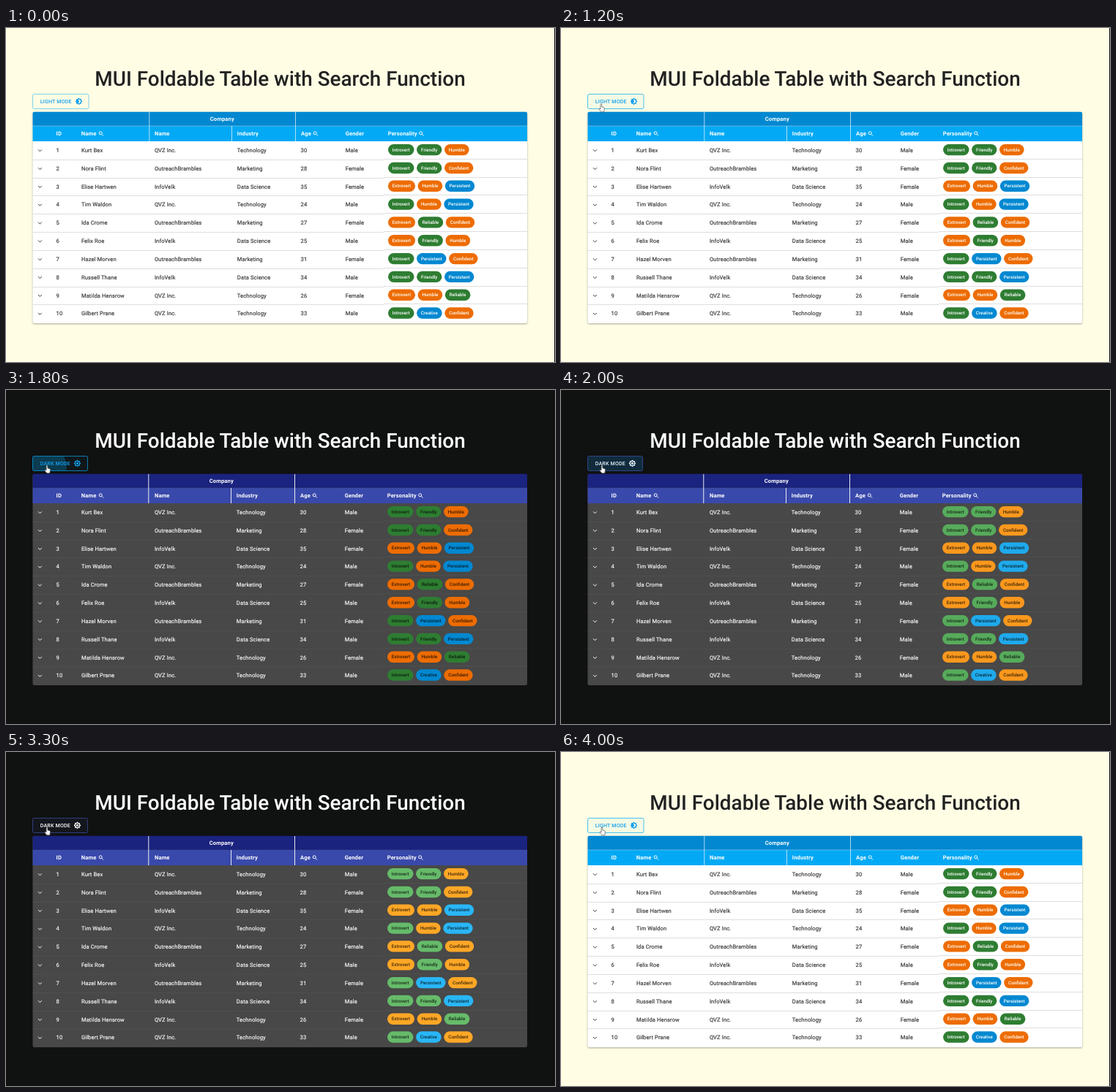
Animation, 750 px wide and 457 px high, one loop 4.4 s. Source, as an HTML page:

```html
<!DOCTYPE html>
<html lang="en">
<head>
<meta charset="utf-8">
<title>Foldable table</title>
<style>
  html, body { margin: 0; width: 100%; height: 100%; overflow: hidden; }
  svg {
    display: block; width: 750px; height: 457px;
    font: 7.58px Roboto, Arial, sans-serif; letter-spacing: .12px;
    text-rendering: geometricPrecision;
    --page: #fffde4; --paper: #fff; --ink: #333; --title: #222;
    --head1: #0288d1; --head2: #03a9f4; --rule: #dedede;
    --split: rgba(235, 245, 250, .75); --headRule: rgba(224, 224, 224, .4);
    --chipText: #fff; --shadow: rgba(0, 0, 0, .35);
  }
  svg.dark {
    --page: #101111; --paper: #484848; --ink: #fff; --title: #fff;
    --head1: #1a237e; --head2: #3949ab; --rule: #4e4e4e;
    --split: rgba(255, 255, 255, .9); --headRule: rgba(81, 81, 81, .25);
    --chipText: rgba(0, 0, 0, .76); --shadow: transparent;
  }
  .dark .shift { transform: translateX(-1px); }
  .title { font-size: 27.9px; font-weight: 500; letter-spacing: 0; fill: var(--title); }
  .head { font-weight: 700; fill: #fff; }
  .cell { fill: var(--ink); stroke: var(--ink); stroke-width: .15px; }
  .chip { font-size: 6.3px; font-weight: 500; letter-spacing: 0; fill: var(--chipText); }
  .label { font-size: 7.1px; font-weight: 500; letter-spacing: .18px; }
  .mid { text-anchor: middle; }
  .line { fill: none; stroke-width: 1; }
</style>
</head>
<body>
<svg id="stage" viewBox="0 0 750 457"></svg>
<script>
const LOOP = 4400, STEP = 100;
const TO_DARK = 1800, TO_LIGHT = 3400;
const MOVE_START = 800, MOVE_END = 1300;

const people = [
  ['Kurt Bex', 0, 30, 'Male', 'IFH'],
  ['Nora Flint', 1, 28, 'Female', 'IFC'],
  ['Elise Hartwen', 2, 35, 'Female', 'EHP'],
  ['Tim Waldon', 0, 24, 'Male', 'IHP'],
  ['Ida Crome', 1, 27, 'Female', 'ERC'],
  ['Felix Roe', 2, 25, 'Male', 'EFH'],
  ['Hazel Morven', 1, 31, 'Female', 'IPC'],
  ['Russell Thane', 2, 34, 'Male', 'IFP'],
  ['Matilda Hensrow', 0, 26, 'Female', 'EHR'],
  ['Gilbert Prane', 0, 33, 'Male', 'IVC']
];
const firms = [
  ['QVZ Inc.', 'Technology'],
  ['OutreachBrambles', 'Marketing'],
  ['InfoVelk', 'Data Science']
];
// label, chip width, colour
const traits = {
  I: ['Introvert', 35.5, 'green'], F: ['Friendly', 34.3, 'green'],
  R: ['Reliable', 34.6, 'green'], H: ['Humble', 33.6, 'orange'],
  C: ['Confident', 39.4, 'orange'], E: ['Extrovert', 37, 'orange'],
  P: ['Persistent', 40.4, 'blue'], V: ['Creative', 34.6, 'blue']
};
const chipColors = {
  green: [[46, 125, 50], [102, 187, 106]],
  orange: [[237, 108, 2], [255, 167, 38]],
  blue: [[2, 136, 209], [41, 182, 246]]
};

const stage = document.getElementById('stage');

function add(tag, attrs, parent = stage, text = '') {
  const el = document.createElementNS('http://www.w3.org/2000/svg', tag);
  for (const key in attrs) el.setAttribute(key, attrs[key]);
  el.textContent = text;
  parent.append(el);
  return el;
}
const rect = (x, y, width, height, fill, more, parent) =>
  add('rect', { x, y, width, height, style: `fill:${fill}`, ...more }, parent);
const path = (d, stroke, more, parent) =>
  add('path', { d, class: 'line', style: `stroke:${stroke}`, ...more }, parent);
const write = (text, x, y, cls, parent) => add('text', { x, y, class: cls }, parent, text);

function searchIcon(x, parent) {
  path(`M${x + .9} 145.4l2.1 2.1M${x + 1.2} 143.8a2 2 0 1 1-4 0a2 2 0 1 1 4 0`, '#fff',
    { 'stroke-width': .85 }, parent);
}

function drawHeader(shifted) {
  rect(36.5, 115, 675.5, 289, 'var(--paper)',
    { rx: 2, style: 'fill:var(--paper);filter:drop-shadow(0 1px 1px var(--shadow))' });
  path('M36.5 134V116.7a2 2 0 0 1 2-2H710a2 2 0 0 1 2 2V134Z', 'none', { style: 'fill:var(--head1)' });
  rect(36.5, 134, 675.5, 21, 'var(--head2)');
  path('M36.5 134H712', 'var(--headRule)');
  path('M195.8 115V155M308.5 134V155M395.5 115V155', 'var(--split)', {}, shifted);
  write('Company', 295.3, 126.6, 'head mid', shifted);
  write('ID', 68.6, 147.2, 'head');
  write('Name', 102.8, 147.2, 'head');
  write('Name', 203, 147.2, 'head');
  for (const [label, x] of [['Industry', 315.8], ['Age', 403], ['Gender', 463.7], ['Personality', 521.7]])
    write(label, x, 147.2, 'head', shifted);
  searchIcon(130, stage);
  searchIcon(423, shifted);
  searchIcon(567.5, shifted);
}

function drawRow([name, firm, age, gender, tags], i, shifted) {
  const y = 167.2 + 24.83 * i, base = y + 2.7;
  if (i < 9) {
    const bottom = Math.round(y + 12.6) + .5;
    path(`M36.5 ${bottom}H516M516 ${bottom - 1}H712`, 'var(--rule)');
  }
  path(`M44 ${y - .8}l2.4 2.4l2.4 -2.4`, 'var(--ink)', { 'stroke-width': 1.2 });
  write(i + 1, 68.6, base, 'cell');
  write(name, 102.9, base, 'cell');
  write(firms[firm][0], 202.9, base, 'cell');
  write(firms[firm][1], 315.8, base, 'cell', shifted);
  write(age, 402.6, base, 'cell', shifted);
  write(gender, 463.7, base, 'cell', shifted);
  let x = 522;
  for (const tag of tags) {
    const [label, width, color] = traits[tag];
    rect(x, y - 8.3, width, 15.4, `var(--${color})`, { rx: 7.7 }, shifted);
    write(label, x + width / 2, y + 1.6, 'chip mid', shifted);
    x += width + 3.6;
  }
}

rect(0, 0, 750, 457, 'var(--page)');
rect(749, 0, 1, 457, '#111');
write('MUI Foldable Table with Search Function', 374.5, 78.8, 'title mid');

const shifted = add('g', { class: 'shift' });
drawHeader(shifted);
stage.append(shifted);
people.forEach((person, i) => drawRow(person, i, shifted));

// Theme button
const clip = add('clipPath', { id: 'inside' });
const clipBox = rect(36.5, 90.5, 76.5, 20, '#000', { rx: 2 }, clip);
const ripple = add('circle', { cx: 56, cy: 105, 'clip-path': 'url(#inside)' });
const box = rect(36.5, 90.5, 76.5, 20, 'none', { rx: 2 });
const label = write('', 46.7, 103, 'label');
const burst = 'M20 8.69V4h-4.69L12 .69 8.69 4H4v4.69L.69 12 4 15.31V20h4.69L12 23.31 15.31 20H20v-4.69L23.31 12Z';
const moon = burst + 'M12 18c-.89 0-1.74-.2-2.5-.55C11.56 16.5 13 14.42 13 12s-1.44-4.5-3.5-5.45C10.26 6.2 11.11 6 12 6c3.31 0 6 2.69 6 6s-2.69 6-6 6Z';
const sun = burst + 'M12 18a6 6 0 1 1 0-12a6 6 0 1 1 0 12ZM12 8a4 4 0 1 0 0 8a4 4 0 1 0 0-8Z';
const icon = add('path', { 'fill-rule': 'evenodd' });

// Pointers
const look = { fill: '#fff', stroke: '#555', 'stroke-width': .7, 'stroke-linejoin': 'round' };
const arrow = add('path', { d: 'M0 0V8.6L2 6.9L3.4 10L4.7 9.4L3.4 6.4H6Z', ...look });
const hand = add('path', {
  d: 'M-.9 .6Q0 -.5 .9 .6V4L3.6 4.7Q4.6 5 4.4 6.2L3.8 10.8H-.2L-3 7.2Q-3.2 6 -2.1 6.2L-.9 7Z', ...look
});

const clamp = v => Math.min(1, Math.max(0, v));
const smooth = v => v * v * (3 - 2 * v);
const mix = (a, b, p) => `rgba(${a.map((v, i) => v + (b[i] - v) * p).join()})`;

// Share of the dark look, eased after each switch
function darkness(t, span) {
  return t < TO_LIGHT ? smooth(clamp((t - TO_DARK) / span)) : 1 - smooth(clamp((t - TO_LIGHT) / span));
}

function drawRipple(t) {
  const second = t >= TO_LIGHT - 100;
  const age = t - (second ? TO_LIGHT : TO_DARK) + 100;
  const on = age > 0 && age < 600;
  ripple.setAttribute('r', on ? (second ? 80 : 27 * age / 100) : 0);
  ripple.setAttribute('fill', second ? '#777' : '#03a9f4');
  ripple.setAttribute('opacity', (second ? .16 : .25) * clamp((600 - age) / 500));
}

function drawPointer(t) {
  const p = clamp((t - MOVE_START) / (MOVE_END - MOVE_START));
  const e = 1 - (1 - p) ** 2;
  const x = 28 + 28 * e, y = 126 - 23 * e;
  const visible = t >= MOVE_START, hover = visible && y < 111;
  for (const [el, shown] of [[arrow, visible && !hover], [hand, hover]]) {
    el.setAttribute('transform', `translate(${x} ${y})`);
    el.style.display = shown ? '' : 'none';
  }
  return hover;
}

function render(t) {
  const dark = t >= TO_DARK && t < TO_LIGHT;
  stage.classList.toggle('dark', dark);
  const chipPart = darkness(t, 300), buttonPart = darkness(t, 250);
  for (const name in chipColors)
    stage.style.setProperty('--' + name, mix(...chipColors[name], chipPart));

  const hover = drawPointer(t);
  drawRipple(t);
  const width = dark ? 75 : 76.5;
  const color = mix([20, 160, 238, 1], [255, 255, 255, 1], buttonPart);
  box.setAttribute('width', width);
  clipBox.setAttribute('width', width);
  box.style.stroke = mix([3, 169, 244, hover ? .7 : .5], [57, 73, 150, .8], buttonPart);
  box.style.fill = mix([3, 169, 244, hover ? .04 : 0], [63, 81, 181, .08], buttonPart);
  label.textContent = dark ? 'DARK MODE' : 'LIGHT MODE';
  label.style.fill = icon.style.fill = color;
  icon.setAttribute('d', dark ? sun : moon);
  icon.setAttribute('transform', `translate(${dark ? 92.3 : 94.3} 95.2) scale(.43)`);
}

const start = performance.now();
function tick() {
  const t = (performance.now() - start) % LOOP;
  render(Math.floor(t / STEP) * STEP);
  requestAnimationFrame(tick);
}
tick();
</script>
</body>
</html>
```
